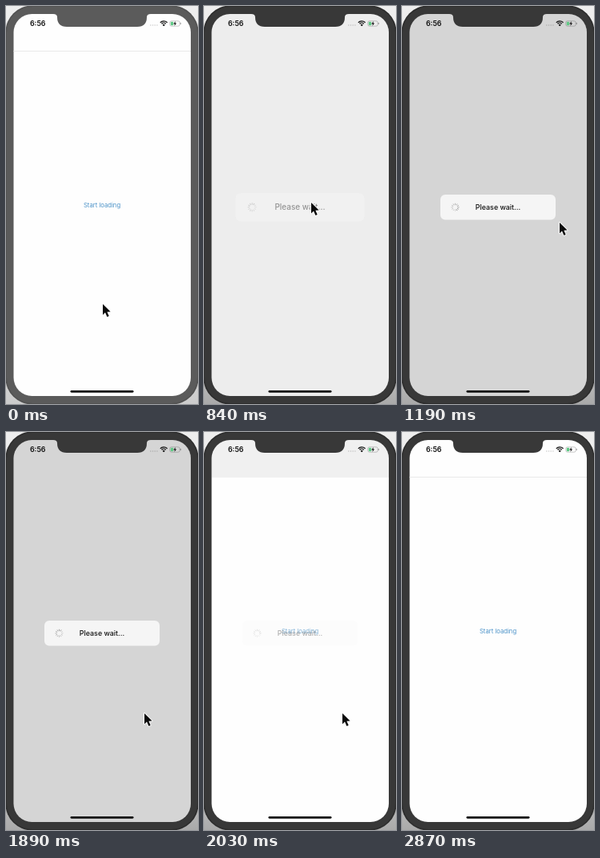
An HTML page with a canvas that plays this animation: 240x498 px, repeating every 3.22 s.

```html
<!DOCTYPE html>
<html lang="en">
<head>
<meta charset="utf-8">
<title>Loading dialog</title>
<style>
html, body { margin: 0; width: 100%; height: 100%; overflow: hidden; background: #eee; }
canvas { display: block; width: 100%; height: 100%; }
</style>
</head>
<body>
<canvas id="stage" width="240" height="498"></canvas>
<script>
const ctx = document.getElementById('stage').getContext('2d');
const LOOP = 3220, STEP = 70;
const SHOWN = 980, CLOSING = 1890;

// Keys: [time, value, ...]
const dialogKeys = [[770, 0], [840, .41], [910, .75], [SHOWN, 1], [CLOSING, 1], [2100, 0]];
const cursorKeys = [
  [0, 121, 373], [140, 125, 354], [280, 132, 309], [420, 137, 264], [560, 134, 246],
  [840, 134, 246], [980, 152, 252], [1190, 197, 271], [1330, 197, 285],
  [1540, 182, 330], [1680, 173, 352],
  [2590, 173, 352], [2660, 163, 375], [2730, 138, 424], [2800, 107, 486], [2870, 104, 520]
];

function sample(keys, t) {
  if (t <= keys[0][0]) return keys[0].slice(1);
  const i = keys.findIndex(k => k[0] >= t);
  if (i < 0) return keys[keys.length - 1].slice(1);
  const a = keys[i - 1], b = keys[i], p = (t - a[0]) / (b[0] - a[0]);
  return a.slice(1).map((v, n) => v + (b[n + 1] - v) * p);
}

function box(x, y, w, h, r, color) {
  ctx.fillStyle = color;
  ctx.beginPath();
  ctx.roundRect(x, y, w, h, r);
  ctx.fill();
}

function label(text, x, y, font, color) {
  ctx.font = font + ' Inter, "Liberation Sans", sans-serif';
  ctx.textAlign = 'center';
  ctx.fillStyle = color;
  ctx.fillText(text, x, y);
}

function drawPhone(focused) {
  const backdrop = ctx.createLinearGradient(0, 0, 0, 498);
  backdrop.addColorStop(0, '#eee');
  backdrop.addColorStop(.8, '#ddd');
  backdrop.addColorStop(1, focused ? '#aaa' : '#ccc');
  ctx.fillStyle = backdrop;
  ctx.fillRect(0, 0, 240, 498);
  box(-.5, -.5, 241, 499, 33, focused ? '#2d2d2d' : '#525252');
  box(1, 1, 238, 496, 32, focused ? '#383838' : '#5b5b5b');
}

function drawNotch(color) {
  ctx.fillStyle = color;
  ctx.beginPath();
  ctx.moveTo(59, 9);
  ctx.lineTo(59, 10);
  ctx.quadraticCurveTo(64, 10, 64, 14);
  ctx.quadraticCurveTo(64, 26, 76, 26);
  ctx.lineTo(164, 26);
  ctx.quadraticCurveTo(176, 26, 176, 14);
  ctx.quadraticCurveTo(176, 10, 181, 10);
  ctx.lineTo(181, 9);
  ctx.fill();
}

function drawStatusBar() {
  label('6:56', 39.7, 25.2, '600 8.9px', '#111');
  for (let i = 0; i < 4; i++) box(180 + i * 2.7, 23.2, 1.6, 1.6, .8, 'rgba(0,0,0,.2)');

  ctx.strokeStyle = '#111';
  ctx.lineWidth = 1.3;
  for (const r of [6, 3.7]) {
    ctx.beginPath();
    ctx.arc(197.2, 24.8, r, -Math.PI * .76, -Math.PI * .24);
    ctx.stroke();
  }
  ctx.fillStyle = '#111';
  ctx.beginPath();
  ctx.moveTo(197.2, 25.2);
  ctx.arc(197.2, 25.2, 2.2, -Math.PI * .76, -Math.PI * .24);
  ctx.fill();

  ctx.strokeStyle = 'rgba(0,0,0,.3)';
  ctx.lineWidth = .7;
  ctx.beginPath();
  ctx.roundRect(204.8, 18.8, 12.4, 6.4, 2);
  ctx.stroke();
  box(217.8, 20.8, .9, 2.4, .4, 'rgba(0,0,0,.35)');
  box(205.8, 19.8, 3.4, 4.4, 1, '#62c987');
  ctx.fillStyle = '#111';
  ctx.beginPath();
  for (const [x, y] of [[211.8, 19], [209.2, 22.4], [211, 22.4], [210.4, 25], [213.2, 21.5], [211.4, 21.5]]) ctx.lineTo(x, y);
  ctx.fill();
}

function drawSpinner(x, y, t) {
  const lead = Math.floor(t / 83);
  ctx.lineWidth = .9;
  for (let i = 0; i < 12; i++) {
    const a = i * Math.PI / 6, fade = ((lead - i) % 12 + 12) % 12 / 12;
    ctx.strokeStyle = `rgba(110,110,110,${.75 - .5 * fade})`;
    ctx.beginPath();
    ctx.moveTo(x + 2.8 * Math.cos(a), y + 2.8 * Math.sin(a));
    ctx.lineTo(x + 5 * Math.cos(a), y + 5 * Math.sin(a));
    ctx.stroke();
  }
}

function drawDialog(t, alpha) {
  const opening = t < SHOWN, scale = opening ? 1.2 - .2 * alpha : 1;
  ctx.save();
  ctx.translate(120, 251.8);
  ctx.scale(scale, scale);
  ctx.globalAlpha = opening ? Math.sqrt(alpha) : alpha;
  box(-72, -15.8, 144, 31.6, 6, '#f5f5f5');
  ctx.globalAlpha = alpha;
  drawSpinner(-53.5, 0, t);
  label('Please wait...', 0, 3.2, '500 8.9px', '#111');
  ctx.restore();
}

function drawScreen(t) {
  const [alpha] = sample(dialogKeys, t);
  ctx.save();
  ctx.beginPath();
  ctx.roundRect(9.5, 10, 221.5, 478, 23);
  ctx.clip();
  ctx.fillStyle = '#fefefe';
  ctx.fillRect(0, 0, 240, 498);
  if (!alpha) {
    ctx.fillStyle = '#e9e9e9';
    ctx.fillRect(9, 56, 222, 1);
  }
  if (!alpha || t > CLOSING) label('Start loading', 120, 252, '400 7.7px', '#4b92c8');
  // The header stays dimmed a little longer than the body.
  ctx.fillStyle = `rgba(0,0,0,${.16 * alpha})`;
  ctx.fillRect(0, 0, 240, 57);
  if (t < 2030) ctx.fillRect(0, 57, 240, 441);
  if (alpha) drawDialog(t, alpha);
  drawStatusBar();
  box(80.5, 481, 79, 2.7, 1.35, '#111');
  ctx.restore();
}

function drawCursor(t) {
  const [x, y] = sample(cursorKeys, t);
  if (t === 630 || t === 700) {
    ctx.strokeStyle = '#111';
    ctx.lineWidth = 1.7;
    ctx.beginPath();
    ctx.arc(133, 247, 21.5, 0, Math.PI * 2);
    ctx.stroke();
  }
  ctx.save();
  ctx.translate(x, y);
  ctx.beginPath();
  for (const [px, py] of [[0, 0], [0, 13.4], [3, 10.6], [5.4, 16], [7.7, 15], [5.4, 9.8], [9.6, 9.6]]) ctx.lineTo(px, py);
  ctx.closePath();
  ctx.lineJoin = 'round';
  ctx.strokeStyle = '#fff';
  ctx.lineWidth = 1.8;
  ctx.stroke();
  ctx.fillStyle = '#0a0a0a';
  ctx.fill();
  ctx.restore();
}

function render(t) {
  const focused = t >= 700;
  drawPhone(focused);
  drawScreen(t);
  drawNotch(focused ? '#383838' : '#5b5b5b');
  if (t < 2870) drawCursor(t);
}

const start = performance.now();
function tick() {
  const elapsed = (performance.now() - start) % LOOP;
  render(Math.floor(elapsed / STEP) * STEP);
  requestAnimationFrame(tick);
}
tick();
</script>
</body>
</html>
```
